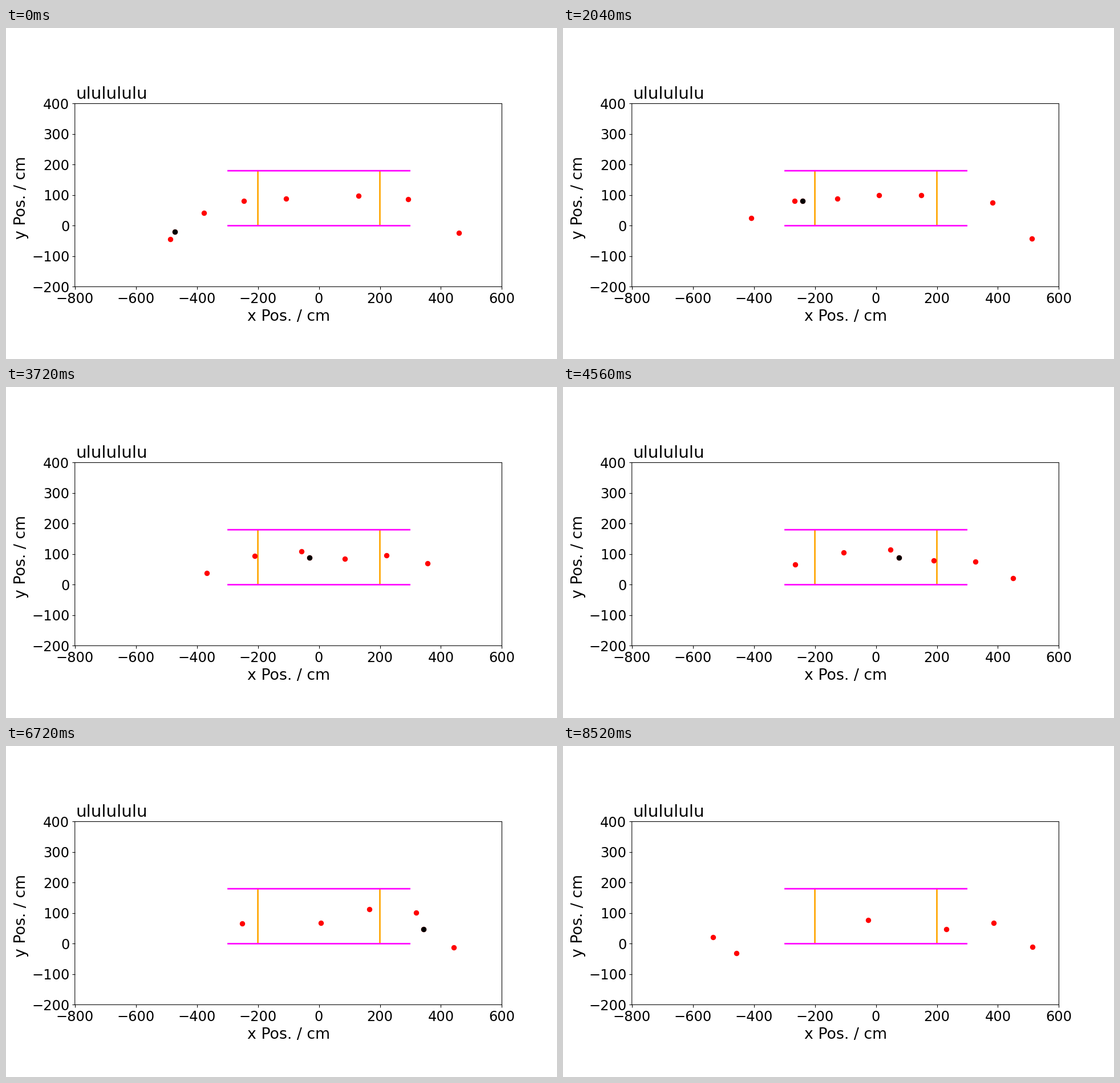
A matplotlib script that plays this animation: 966 by 580 pixels, repeating every 8640 ms.

```python
import numpy as np
import matplotlib.pyplot as plt
from matplotlib.animation import FuncAnimation

FRAMES = 72
INTERVAL = 120
SPEED = 15.1     # cm walked per frame
FALL = 140       # drop of a path 500 cm from its middle
FLOOR = -45      # people are tracked only above this height
GRID = np.linspace(-650, 650, 1301)


class Walker:
    """Walks an arched path at constant speed and is at x = 0 at frame `passing`."""

    def __init__(self, passing, height, lean=0):
        self.passing, self.height, self.lean = passing, height, lean
        steps = np.hypot(np.diff(GRID), np.diff(self.path(GRID)))
        distance = np.concatenate([[0], np.cumsum(steps)])
        self.distance = distance - np.interp(0, GRID, distance)

    def path(self, x):
        u = x / 500
        return self.height + self.lean * u - FALL * np.abs(u) ** 3.5

    def position(self, frame):
        x = np.interp((frame - self.passing) * SPEED, self.distance, GRID)
        return x, self.path(x)


leader = Walker(33, 89, lean=-6)
walkers = [
    Walker(-31.8, 80),
    Walker(-19.5, 108),
    Walker(-8.6, 85, lean=58),
    Walker(7.2, 95, lean=25),
    Walker(16.3, 99, lean=12),
    Walker(25.4, 87, lean=-10),
    leader,
    Walker(34.8, 112, lean=30),
    Walker(45, 110, lean=20),
    Walker(55.6, 68, lean=-25),
    Walker(72.7, 78),
    Walker(103, 85, lean=15),
    Walker(108.4, 90, lean=-100),
]

plt.rcParams.update({"font.family": "DejaVu Sans", "path.snap": False})
fig, ax = plt.subplots(figsize=(10, 6), dpi=96.6)
fig.set_size_inches(966 / 96.6, 580 / 96.6)
ax.set_aspect("equal")
ax.set_xlim(-800, 600)
ax.set_ylim(-200, 400)
ax.tick_params(labelsize=18)
ax.set_xlabel("x Pos. / cm", fontsize=20, labelpad=4.8)
ax.set_ylabel("y Pos. / cm", fontsize=20, y=0.486)
ax.set_title("ululululu", loc="left", x=0.002, fontsize=22)

ax.vlines([-200, 200], 0, 180, color="orange", lw=2)
ax.hlines([0, 180], -300, 300, color="magenta", lw=2)

crowd, = ax.plot([], [], "o", color="red", ms=6)
marked, = ax.plot([], [], "o", color="black", ms=6)


def place(dots, people, frame):
    spots = [p.position(frame) for p in people]
    tracked = [(x, y) for x, y in spots if y > FLOOR]
    dots.set_data(*np.reshape(tracked, (-1, 2)).T)


def update(frame):
    place(crowd, walkers, frame)
    place(marked, [leader], frame)
    return crowd, marked


anim = FuncAnimation(fig, update, frames=FRAMES, interval=INTERVAL,
                     repeat=True, repeat_delay=0, blit=False)
plt.show()
```
